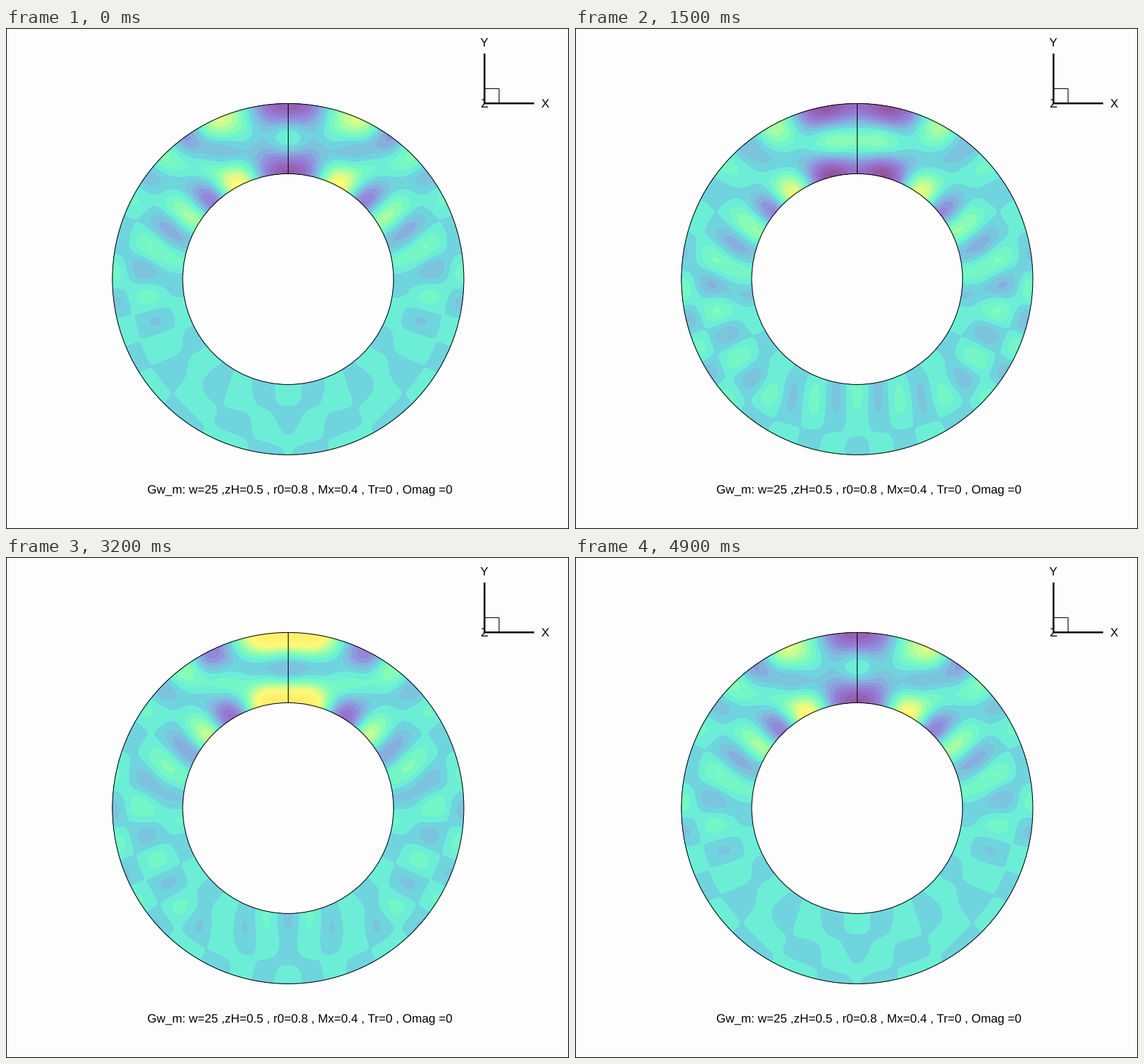
A matplotlib script for the animation above (5000 ms loop, 793 by 706 pixels).

```python
import numpy as np
import matplotlib.pyplot as plt
from matplotlib.animation import FuncAnimation
from matplotlib.patches import Circle, Rectangle

WIDTH, HEIGHT, DPI = 793, 706, 72
FRAMES, INTERVAL, CYCLES = 50, 100, 4

# Annular duct with uniform axial flow and a point source
HUB, SOURCE_R, DISTANCE = 0.6, 0.8, 0.5
OMEGA, MACH = 25.0, 0.4
BETA2 = 1 - MACH**2
CENTER_X, CENTER_Y, RADIUS = 397.4, 353.9, 247.5
PEAK_LEVEL = 9.8

COLOR_STOPS = [
    (-10, 143, 74, 142), (-8, 150, 92, 170), (-6, 150, 114, 204),
    (-4, 144, 142, 220), (-2, 130, 186, 222), (-0.5, 112, 212, 222),
    (0.5, 108, 238, 214), (2, 120, 250, 192), (3.5, 165, 252, 165),
    (5, 215, 252, 140), (6.5, 252, 250, 120), (10, 255, 236, 105),
]


def radial_modes(m, r):
    """Hard-wall radial eigenvalues and normalised shapes of order m."""
    h = r[1] - r[0]
    weight = np.full(r.size, h)
    weight[[0, -1]] /= 2
    flux = (r[:-1] + r[1:]) / (2 * h)
    diagonal = m**2 * weight / r
    diagonal[:-1] += flux
    diagonal[1:] += flux
    stiffness = np.diag(diagonal) - np.diag(flux, 1) - np.diag(flux, -1)
    scale = 1 / np.sqrt(weight * r)
    squared, vectors = np.linalg.eigh(stiffness * np.outer(scale, scale))
    return squared, vectors * scale[:, None]


def greens_function(r, theta, orders=42, radial=7):
    """Modal sum for the sixth-order operator of the acoustic analogy."""
    source = np.argmin(abs(r - SOURCE_R))
    field = np.zeros((r.size, theta.size), complex)
    for m in range(orders):
        squared, shapes = radial_modes(m, r)
        kappa = np.sqrt(OMEGA**2 - BETA2 * squared[:radial] + 0j)
        axial = (kappa - MACH * OMEGA) / BETA2
        convected = OMEGA - MACH * axial
        wave = np.exp(1j * axial * DISTANCE) / (kappa * convected**4)
        profile = shapes[:, :radial] @ (shapes[source, :radial] * wave)
        field += (1 if m == 0 else 2) * np.outer(profile, np.cos(m * theta))
    return 1j * field


def band_colors(levels):
    stops = np.array(COLOR_STOPS, float)
    middle = (levels[:-1] + levels[1:]) / 2
    return np.stack([np.interp(middle, stops[:, 0], stops[:, c]) / 255
                     for c in (1, 2, 3)], axis=1)


r = np.linspace(HUB, 1, 161)
theta = np.linspace(0, 2 * np.pi, 601)
field = greens_function(r, theta)[::2]
field *= PEAK_LEVEL / abs(field).max()
rr, tt = np.meshgrid(r[::2], theta, indexing="ij")
mesh_x = CENTER_X + RADIUS * rr * np.sin(tt)
mesh_y = CENTER_Y - RADIUS * rr * np.cos(tt)
levels = np.arange(-10, 11)
colors = band_colors(levels)

plt.rcParams["font.family"] = "Liberation Sans"
plt.rcParams["text.hinting"] = "none"
fig = plt.figure(figsize=((WIDTH + 0.001) / DPI, (HEIGHT + 0.001) / DPI),
                 dpi=DPI, facecolor="#fdfdfd")
ax = fig.add_axes([0, 0, 1, 1])
ax.axis("off")


def line(x, y, width):
    ax.plot(x, y, color="black", lw=width, solid_capstyle="butt",
            snap=False, zorder=5)


def box(x, y, width, height, **kwargs):
    ax.add_patch(Rectangle((x, y), width, height, ec="black", lw=1,
                           snap=False, **kwargs))


def label(x, y, text, ha="center", **kwargs):
    ax.text(x, y, text, fontsize=17.05, color="black", ha=ha,
            va="baseline", **kwargs)


def draw_static():
    box(0.5, 0.5, WIDTH - 1, HEIGHT - 1, fc="none")
    for radius in (RADIUS, RADIUS * HUB):
        ax.add_patch(Circle((CENTER_X, CENTER_Y), radius,
                            fill=False, ec="black", lw=1, zorder=5))
    line([397.5, 397.5], [CENTER_Y - RADIUS, CENTER_Y - RADIUS * HUB], 1)

    # Axis triad
    label(673.7, 112.3, "Z", zorder=2)
    box(673.5, 85.5, 21, 21, fc="#fdfdfd", zorder=4)
    line([674, 674], [36, 107], 2.5)
    line([673, 744], [106.2, 106.2], 2.5)
    label(673.7, 26, "Y")
    label(759.4, 112.3, "X")

    label(198.5, 656.5,
          "Gw_m: w=25 ,zH=0.5 , r0=0.8 , Mx=0.4 , Tr=0 , Omag =0", ha="left")


draw_static()
ax.set_xlim(0, WIDTH)
ax.set_ylim(HEIGHT, 0)
ax.set_autoscale_on(False)
contours = None


def update(frame):
    global contours
    if contours is not None:
        contours.remove()
    phase = 2 * np.pi * CYCLES * frame / (FRAMES - 1)
    pressure = (field * np.exp(-1j * phase)).real
    contours = ax.contourf(mesh_x, mesh_y, pressure, levels=levels,
                           colors=colors, zorder=1)
    return [contours]


animation = FuncAnimation(fig, update, frames=FRAMES, interval=INTERVAL,
                          init_func=lambda: [], repeat=True, repeat_delay=0)
plt.show()
```
